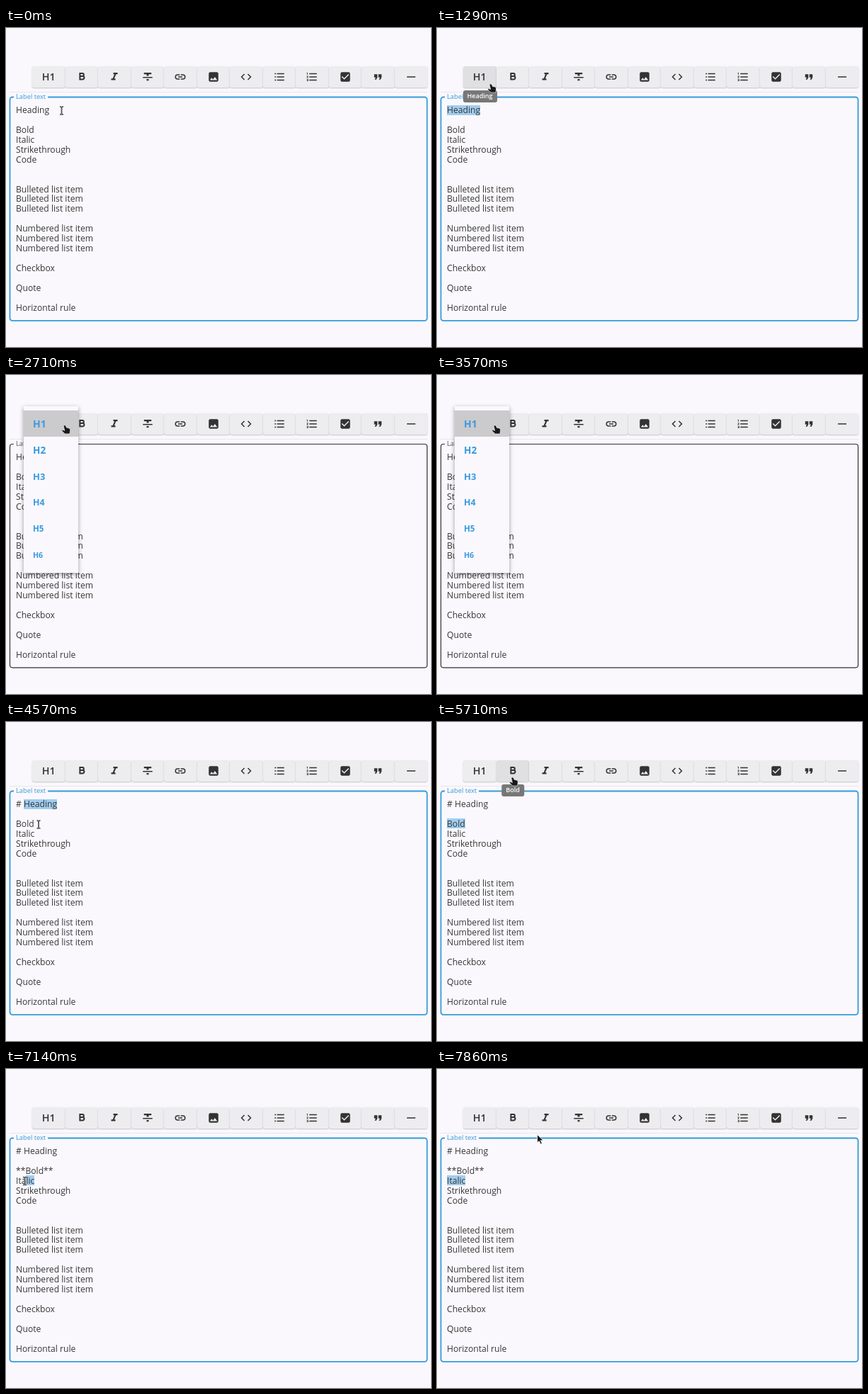
Write an HTML page that moves like this. It is 600x450 px and loops after 8000 ms.

```html
<!DOCTYPE html>
<html lang="en">
<head>
<meta charset="utf-8">
<title>Markdown editor toolbar</title>
<style>
  html, body { margin: 0; width: 100%; height: 100%; overflow: hidden; background: #faf8fc; }
  body { position: relative; color: #363636; font: 12.15px "Open Sans", "Noto Sans", sans-serif; }
  body > * { position: absolute; box-sizing: border-box; }
  #toolbar { left: 37px; top: 54px; display: flex; }
  #toolbar div {
    width: 46.5px; height: 30px; display: flex; align-items: center; justify-content: center;
    box-sizing: border-box; padding-bottom: 1px; border-radius: 3px; background: #edecef; color: #333;
    box-shadow: 0 1px 2px rgba(0, 0, 0, .22); font-size: 14.3px; font-weight: 600;
  }
  #toolbar div:first-child { padding-bottom: 2px; }
  #toolbar .hover { background: #e0dfe2; }
  #rule { left: 5px; top: 90px; width: 590px; height: 1px; background: #e9e7eb; }
  #field { left: 0; top: 0; fill: none; stroke: #359bd9; stroke-width: 1.8px; }
  #label {
    left: 11px; top: 91px; padding: 0 3px; background: #faf8fc; color: #359bd9;
    font-size: 9.3px; line-height: 12px;
  }
  .blurred #field { stroke: #333; stroke-width: 1.2px; }
  .blurred #label { color: #555; }
  #text { left: 14px; top: 109px; line-height: 13.93px; white-space: pre; }
  mark { color: inherit; background: linear-gradient(#a0cdef, #a0cdef) center / 100% 14px no-repeat; }
  #tooltip {
    top: 88px; height: 17px; padding: 0 6px; border-radius: 3px; transform: translateX(-50%);
    background: #777; color: #fff; font-size: 9px; font-weight: 600; line-height: 16px;
  }
  #menu {
    left: 25px; top: 44px; width: 77px; height: 235px; padding-top: 6px; background: #faf8fc;
    box-shadow: 0 2px 6px rgba(0, 0, 0, .38);
  }
  #menu div { height: 37.1px; padding-left: 13px; line-height: 38px; color: #3a9ae0; font-weight: 700; }
  #menu div:first-child { background: #cbcacc; }
  #pointer { left: 0; top: 0; overflow: visible; }
</style>
</head>
<body>
<div id="toolbar"></div>
<div id="rule"></div>
<svg id="field" width="600" height="450"><rect x="5.5" y="97.5" width="589" height="315.3" rx="3.5"/></svg>
<div id="label">Label text</div>
<div id="text"></div>
<div id="tooltip"></div>
<div id="menu"></div>
<svg id="pointer" width="1" height="1">
  <path id="beam" d="M-2.5-5.5Q0-5.5 0-4Q0-5.5 2.5-5.5M0-4V4M-2.5 5.5Q0 5.5 0 4Q0 5.5 2.5 5.5" fill="none" stroke="#666" stroke-width="2"/>
  <path id="hand" d="M0 0Q1.4-.4 2 1L3.2 3.4 7 4.2Q8.4 4.8 8.2 7L7.6 12H.8L-3.6 7.8Q-3.6 6.6-2 6.6L.4 7.6-1 1.6Q-1 .4 0 0Z" fill="#181818" stroke="#f4f4f4" stroke-width=".6"/>
  <path id="arrow" d="M0 0V11.5L2.7 9.1 4.7 13.4 6.8 12.4 4.9 8.3H8.6Z" fill="#161616" stroke="#fff" stroke-width=".8"/>
</svg>
<script>
const $ = id => document.getElementById(id);
const LOOP = 8000, STEP = LOOP / 56, TEXT_LEFT = 14;
const clamp = v => Math.max(0, Math.min(1, v));

// Icons on a 24 unit grid: [path, stroke width], 0 means filled
const icons = [
  ["M8.5 5.3h4.6a2.7 2.7 0 0 1 0 5.4h-4.6zM8.5 10.7h5.1a2.9 2.9 0 0 1 0 5.9h-5.1z", 2.7],
  ["M10 4v3h2.2l-3.4 8H6v3h8v-3h-2.2l3.4-8H18V4z", 0],
  ["M10 19h4v-3h-4zM5 4v3h5v3h4V7h5V4zM3 14h18v-2H3z", 0],
  ["M11 8H7a4 4 0 0 0 0 8h4M13 8h4a4 4 0 0 1 0 8h-4M8 12h8", 2],
  ["M5 3h14l2 2v14l-2 2H5l-2-2V5zM8.5 13.5l2.5 3 3.5-4.5 4.5 6H5z", 0],
  ["M8.7 6.7L3.4 12l5.3 5.3M15.3 6.7l5.3 5.3-5.3 5.3", 2],
  ["M3 6h2.5M3 12h2.5M3 18h2.5M7.5 6H21M7.5 12H21M7.5 18H21", 2.2],
  ["M2 17h2v.5H3v1h1v.5H2v1h3v-4H2zM3 8h1V4H2v1h1zM2 11h1.8L2 13.1v.9h3v-1H3.2L5 10.9V10H2zM7 5h14v2H7zM7 11h14v2H7zM7 17h14v2H7z", 0],
  ["M5 3h14l2 2v14l-2 2H5l-2-2V5zM10 17l9-9-1.4-1.4-7.6 7.6-3.6-3.6L5 12z", 0],
  ["M6 17h3l2-4V7H5v6h3zM14 17h3l2-4V7h-6v6h3z", 0],
  ["M4 11h16v2H4z", 0]
];
$("toolbar").innerHTML = "<div>H1</div>" + icons.map(([d, w]) =>
  `<div><svg width="18" height="18" viewBox="0 0 24 24"><path d="${d}" fill-rule="evenodd"
    fill="${w ? "none" : "#333"}" stroke="${w ? "#333" : "none"}" stroke-width="${w}"/></svg></div>`).join("");
$("menu").innerHTML = [14, 13.6, 13, 12.4, 11.6, 10.6]
  .map((size, i) => `<div style="font-size:${size}px"><span>H${i + 1}</span></div>`).join("");
const buttons = [...$("toolbar").children];
const menuItems = [...$("menu").querySelectorAll("span")];

const lines = ["Heading", "", "Bold", "Italic", "Strikethrough", "Code", "", "",
  ...Array(3).fill("Bulleted list item"), "", ...Array(3).fill("Numbered list item"), "",
  "Checkbox", "", "Quote", "", "Horizontal rule"];

// Pointer hot spot: [time, x, y]
const route = [
  [140, 78.5, 116.5], [710, 6, 116], [860, 6, 116], [1290, 75.3, 79], [2430, 75.3, 79],
  [2860, 85, 68], [3430, 81.3, 71], [3860, 81.3, 71], [4430, 46, 144.5], [4710, 46, 144.5],
  [5140, 6, 144], [5290, 6, 144], [5570, 106, 78], [6000, 106, 78], [6290, 40, 140],
  [6500, 40, 140], [6860, 46, 158], [7000, 46, 158], [7290, 6, 158], [7430, 6, 158],
  [7860, 141.5, 92.5]
];
// Selections dragged from the end of a line; signs are added around the word later
const drags = [
  { line: 0, start: 140, end: 710, clear: 4700, before: "# ", after: "", marked: 3840 },
  { line: 2, start: 4700, end: 5140, clear: 6990, before: "**", after: "**", marked: 5990 },
  { line: 3, start: 6990, end: 7290, clear: LOOP, before: "", after: "", marked: LOOP }
];
const MENU_OPEN = 1700, MENU_CLOSE = 3700;

const ruler = document.createElement("canvas").getContext("2d");
ruler.font = getComputedStyle(document.body).font;

function pointerAt(t) {
  const next = route.findIndex(p => p[0] > t);
  if (next === 0) return route[0].slice(1);
  if (next < 0) return route.at(-1).slice(1);
  const [t0, x0, y0] = route[next - 1], [t1, x1, y1] = route[next];
  const u = (t - t0) / (t1 - t0), e = u * u * (3 - 2 * u);
  return [x0 + (x1 - x0) * e, y0 + (y1 - y0) * e];
}

function selectionStart(word, x) {
  let i = word.length;
  while (i > 0 && TEXT_LEFT + ruler.measureText(word.slice(0, i)).width > x + 3) i--;
  return i;
}

function textAt(t, focused) {
  const shown = [...lines];
  for (const d of drags) {
    let word = lines[d.line];
    if (focused && t >= d.start && t < d.clear) {
      const i = selectionStart(word, pointerAt(Math.min(t, d.end))[0]);
      word = `${word.slice(0, i)}<mark>${word.slice(i)}</mark>`;
    }
    shown[d.line] = t >= d.marked ? d.before + word + d.after : word;
  }
  return shown.join("\n");
}

function draw(t) {
  const [x, y] = pointerAt(t);
  const focused = t < MENU_OPEN || t >= MENU_CLOSE + 140;
  const menuOpacity = t < MENU_OPEN ? 0 : t < MENU_CLOSE
    ? clamp((t - MENU_OPEN + 60) / 120) : clamp(1 - (t - MENU_CLOSE) / 140);
  document.body.className = focused ? "" : "blurred";
  $("text").innerHTML = textAt(t, focused);

  $("menu").style.opacity = menuOpacity;
  menuItems.forEach((item, i) => item.style.opacity = clamp((t - MENU_OPEN - 20 - i * 45) / 100));

  const overToolbar = y >= 54 && y <= 84 && x >= 37;
  const hovered = overToolbar && focused ? Math.floor((x - 37) / 46.5) : -1;
  buttons.forEach((b, i) => b.classList.toggle("hover", i === hovered));
  const tip = t > 1270 && t < MENU_OPEN ? 0 : t > 5700 && t < 5990 ? 1 : -1;
  $("tooltip").hidden = tip < 0;
  $("tooltip").textContent = ["Heading", "Bold"][tip] || "";
  $("tooltip").style.left = 60.5 + 46.5 * tip + "px";

  const kind = overToolbar || !focused ? "hand" : y < 97 ? "arrow" : "beam";
  for (const id of ["hand", "arrow", "beam"]) $(id).style.display = id === kind ? "" : "none";
  $("pointer").style.transform = `translate(${x}px, ${y}px)`;
}

let lastStep = -1;
function tick(now) {
  const step = Math.floor((now % LOOP + 5) / STEP) % 56;
  if (step !== lastStep) draw((lastStep = step) * STEP);
  requestAnimationFrame(tick);
}
draw(0);
requestAnimationFrame(tick);
</script>
</body>
</html>
```
